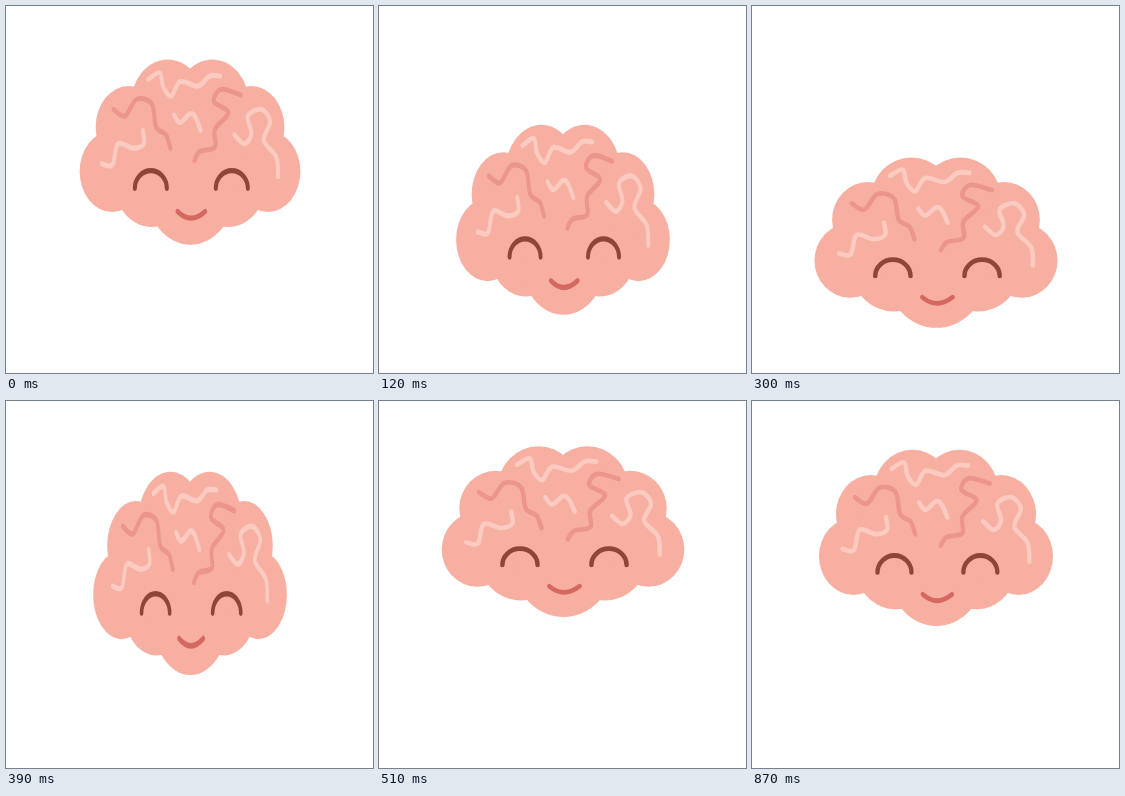
Recreate the animation shown at these times as an HTML page. Size 367 by 367 pixels, loop 900 ms.

```html
<!DOCTYPE html>
<html lang="en">
<head>
<meta charset="utf-8">
<title>Bouncing brain</title>
<style>
  html, body { margin: 0; width: 100%; height: 100%; overflow: hidden; background: #fff; }
  svg { display: block; width: 100vw; height: 100vh; }
  .line { fill: none; stroke-width: 4.6; stroke-linecap: round; stroke-linejoin: round; }
</style>
</head>
<body>
<svg viewBox="0 0 367 367">
  <g id="brain">
    <g id="lobes" fill="#f7afa2"></g>
    <g id="light" class="line" stroke="#fbcac0"></g>
    <g id="dark" class="line" stroke="#ec958c"></g>
    <path class="line" stroke="#8f463a" d="M122 161.2a18 16 0 0 1 36 0m55 0a18 16 0 0 1 36 0"/>
    <path class="line" stroke="#d5685f" d="M170 182q15 12 31 0"/>
  </g>
</svg>
<script>
const LOOP = 900, STEP = 30, APEX = 675;
const WIDTH = 248, HEIGHT = 167, CENTER = 184, BASE = 212;
const get = id => document.getElementById(id);

const circle = (x, y, r) => `<circle cx="${x}" cy="${y}" r="${r}"/>`;
const mirrored = (dx, y, r) => circle(CENTER - dx, y, r) + circle(CENTER + dx, y, r);

// Smooth curve through a few "x,y" points
function curve(text) {
  const p = text.split(' ').map(s => s.split(',').map(Number));
  let d = 'M' + p[0];
  for (let i = 0; i < p.length - 1; i++) {
    const before = p[i - 1] || p[i], after = p[i + 2] || p[i + 1];
    const c1 = p[i].map((v, k) => v + (p[i + 1][k] - before[k]) / 6);
    const c2 = p[i + 1].map((v, k) => v - (after[k] - p[i][k]) / 6);
    d += `C${c1} ${c2} ${p[i + 1]}`;
  }
  return `<path d="${d}"/>`;
}

get('lobes').innerHTML =
  mirrored(25, 87, 42) + mirrored(69, 106, 37) + mirrored(87.5, 146, 36.5) +
  mirrored(43, 152, 44) + circle(184.5, 162, 50) + circle(CENTER, 125, 60);

get('light').innerHTML =
  curve('137,63 150,57 154,70 163,78 173,65 193,69 206,60 218,60') +
  curve('166,95 173,102 184,94 190,97 196,109') +
  curve('85,139 97,140 103,121 120,125 132,121 131,109') +
  curve('234,113 245,121 253,112 249,96 264,90 274,101 267,118 281,133 283,151');

get('dark').innerHTML =
  curve('98,90 111,96 124,81 141,85 146,106 157,113 162,125') +
  curve('241,77 219,72 211,83 227,93 212,108 212,124 195,128 189,136');

// Sine ease in and out between two times; power > 1 delays the start
function ease(time, from, to, power = 1) {
  const u = Math.min(1, Math.max(0, (time - from) / (to - from)));
  return Math.sin(Math.PI / 2 * u ** power) ** 2;
}

// The fall mirrors the rise, so the pose depends on the time away from the apex
function draw(now) {
  const gap = Math.abs(Math.floor(now % LOOP / STEP) * STEP - APEX);
  const d = Math.min(gap, LOOP - gap);
  const bottom = BASE + 121 * ease(d, 130, 435);
  const stretch = -56 * ease(d, 75, 300, 1.75) + 87 * ease(d, 300, 435);
  const sx = 1 + stretch / WIDTH, sy = 1 - 0.67 * stretch / HEIGHT;
  get('brain').setAttribute('transform',
    `translate(${CENTER} ${bottom}) scale(${sx} ${sy}) translate(${-CENTER} ${-BASE})`);
}

const start = performance.now();
function tick() {
  draw(performance.now() - start);
  requestAnimationFrame(tick);
}
tick();
</script>
</body>
</html>
```
